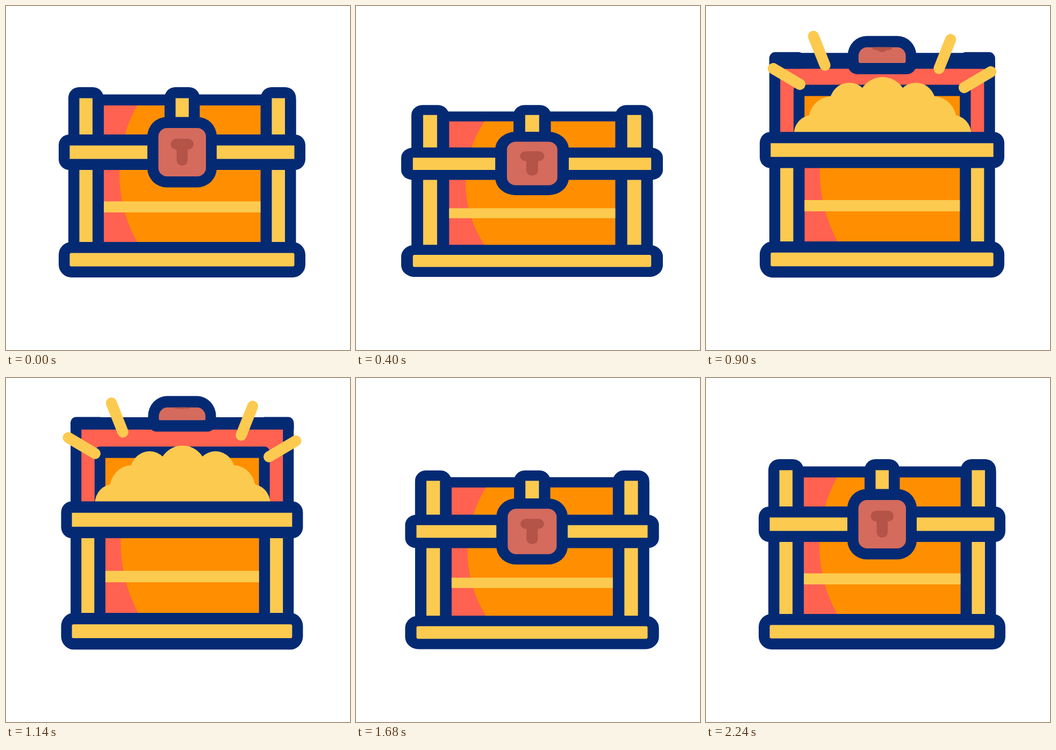
Write an HTML page with a canvas that moves like this. It is 640 px wide and 640 px high and loops after 2600 ms.

```html
<!DOCTYPE html>
<html lang="en">
<head>
<meta charset="utf-8">
<title>Treasure chest</title>
<style>
  html, body { margin: 0; width: 100%; height: 100%; overflow: hidden; background: #fff; }
  canvas { display: block; width: 100vw; height: 100vh; }
</style>
</head>
<body>
<canvas id="stage" width="640" height="640"></canvas>
<script>
const ctx = document.getElementById('stage').getContext('2d');
const LOOP = 2600;
const MID = 327.5, FLOOR = 495, LINE = 20.5;
const LEFT = 116, RIGHT = 539.5, POST = 65.5;
const NAVY = '#042a74', GOLD = '#fdca50', ORANGE = '#ff8f00', RED = '#ff6250';
const PINK = '#d46b5d', DARK = '#b45347';

const mix = (a, b, p) => a + (b - a) * p;
const span = (t, from, to) => Math.min(1, Math.max(0, (t - from) / (to - from)));
const swing = u => (1 - Math.cos(Math.PI * u)) / 2;
const settle = k => u => (1 - Math.exp(-k * u)) / (1 - Math.exp(-k));

// Squash and stretch, each step easing from the pose before it
const POSES = [
  { at: 160, w: 1, h: 1, ease: swing },
  { at: 400, w: 1.061, h: 0.9025, ease: swing },
  { at: 1300, w: 0.976, h: 1.044, ease: settle(2.5) },
  { at: 1560, w: 1.1, h: 0.79, ease: u => u ** 4 },
  { at: 1900, w: 0.989, h: 1.0225, ease: settle(2.5) },
  { at: 2240, w: 1, h: 1, ease: swing },
];

function squash(t) {
  let w = 1, h = 1, from = 0;
  for (const pose of POSES) {
    const e = pose.ease(span(t, from, pose.at));
    w = mix(w, pose.w, e);
    h = mix(h, pose.h, e);
    from = pose.at;
  }
  return [w, h];
}

const lidOpening = t => settle(3.6)(span(t, 400, 1300)) * (1 - span(t, 1400, 1540) ** 2);

// Box given by its edges, with an optional corner radius
function box(color, x0, y0, x1, y1, r = 0) {
  if (y1 <= y0) return;
  ctx.fillStyle = color;
  ctx.beginPath();
  ctx.roundRect(x0, y0, x1 - x0, y1 - y0, r);
  ctx.fill();
}

function framed(x0, y0, x1, y1, r, fill, innerR = 0) {
  box(NAVY, x0, y0, x1, y1, r);
  box(fill, x0 + LINE, y0 + LINE, x1 - LINE, y1 - LINE, innerR);
}

function disc(color, x, y, r) {
  ctx.fillStyle = color;
  ctx.beginPath();
  ctx.arc(x, y, r, 0, Math.PI * 2);
  ctx.fill();
}

function clipped(x0, y0, x1, y1, r, draw) {
  if (y1 <= y0) return;
  ctx.save();
  ctx.beginPath();
  ctx.roundRect(x0, y0, x1 - x0, y1 - y0, r);
  ctx.clip();
  draw();
  ctx.restore();
}

function panel() {
  box(RED, 182, 180, 473.5, 445);
  disc(ORANGE, 472, 312, 261);
}

function coins() {
  const axis = 328.5;
  for (const [x, y, r] of [[131.5, 243, 35], [95.5, 217, 43], [62.5, 186, 37], [0, 185, 46]]) {
    disc(GOLD, axis - x, y, r);
    disc(GOLD, axis + x, y, r);
  }
  // Fills the gaps under the bumps
  ctx.beginPath();
  for (const [x, y] of [[0, 159], [37.5, 159], [97.5, 174], [137.5, 209], [165, 245], [0, 245]]) {
    ctx.lineTo(axis + x, y);
  }
  for (const [x, y] of [[165, 245], [137.5, 209], [97.5, 174], [37.5, 159]]) {
    ctx.lineTo(axis - x, y);
  }
  ctx.fill();
}

function lid(p) {
  const cap = mix(151, 86, p), top = mix(164.5, 86, p);
  const edge = mix(259.5, 106.5, p), inner = mix(280, 137, p);
  const faceTop = top + LINE, faceEnd = edge - LINE;
  const round = mix(20, 10, p);

  // Inside of the lid
  box(NAVY, LEFT, top, RIGHT, 270, 10);
  box(RED, LEFT + LINE, edge, RIGHT - LINE, 270);
  framed(161.5, inner, 494, 320, 10, ORANGE);
  clipped(98, edge - 10, 557, 290, 0, coins);

  // Front of the lid
  box(NAVY, LEFT, faceEnd, RIGHT, edge, [10, 10, 0, 0]);
  clipped(182, faceTop, 473.5, faceEnd, 0, () => {
    const k = (faceEnd - faceTop) / 54;
    ctx.translate(0, faceTop - 185 * k);
    ctx.scale(1, k);
    panel();
  });
  for (const x of [LEFT, 295, RIGHT - POST]) {
    box(NAVY, x, cap, x + POST, edge, [round, round, 0, 0]);
    box(GOLD, x + LINE, cap + LINE, x + POST - LINE, faceEnd);
  }
}

function body() {
  box(NAVY, LEFT, 285, RIGHT, 460);
  clipped(182, 304.5, 473.5, 439, 0, panel);
  box(GOLD, 182, 363.5, 473.5, 384);
  for (const x of [LEFT, RIGHT - POST]) box(GOLD, x + LINE, 304.5, x + POST - LINE, 439);
  framed(98, 239, 557, 305, 20, GOLD);
  framed(98, 439, 557, 505, 24, GOLD, 3);
}

function lock(p) {
  const low = mix(36, 16, p), lowIn = mix(16, 2, p);
  const top = mix(227, 66.5, p), end = mix(317, 87.7, p);
  const hole = end - 20, bar = hole - 30 * (1 - p);
  box(NAVY, 263, top - LINE, 392, end + LINE, [36, 36, low, low]);
  box(PINK, 283.5, top, 372, end, [16, 16, lowIn, lowIn]);
  clipped(283.5, top, 372, end, 16, () => {
    box(DARK, 306.5, bar - 20, 349, bar, 10);
    box(DARK, 317.5, bar - 20, 338, hole, 10);
  });
}

// Beams shoot outwards, drift on, then draw back in
function rays(t) {
  const back = 1 - span(t, 1400, 1500) ** 2;
  const length = 58 * span(t, 660, 860) * back;
  const shift = mix(-41, 13, settle(3.6)(span(t, 660, 1300)) * back);
  if (length < 0.5) return;
  ctx.strokeStyle = GOLD;
  ctx.lineCap = 'round';
  ctx.lineWidth = Math.min(LINE, length);
  const beam = (x, y, dx, dy) => {
    ctx.beginPath();
    ctx.moveTo(x + dx * shift, y + dy * shift);
    ctx.lineTo(x + dx * (shift + length), y + dy * (shift + length));
    ctx.stroke();
  };
  for (const [x, y, dx, dy] of [[221.5, 110.5, -0.37, -0.93], [175, 146, -0.86, -0.51]]) {
    beam(x, y, dx, dy);
    beam(2 * MID - x, y + 6, -dx, dy);
  }
}

function render(t) {
  const p = lidOpening(t);
  ctx.fillStyle = '#fff';
  ctx.fillRect(0, 0, 640, 640);
  ctx.save();
  ctx.translate(MID, FLOOR);
  ctx.scale(...squash(t));
  ctx.translate(-MID, -FLOOR);
  lid(p);
  body();
  lock(p);
  ctx.restore();
  rays(t);
}

const start = performance.now();
function tick() {
  render((performance.now() - start) % LOOP);
  requestAnimationFrame(tick);
}
tick();
</script>
</body>
</html>
```
